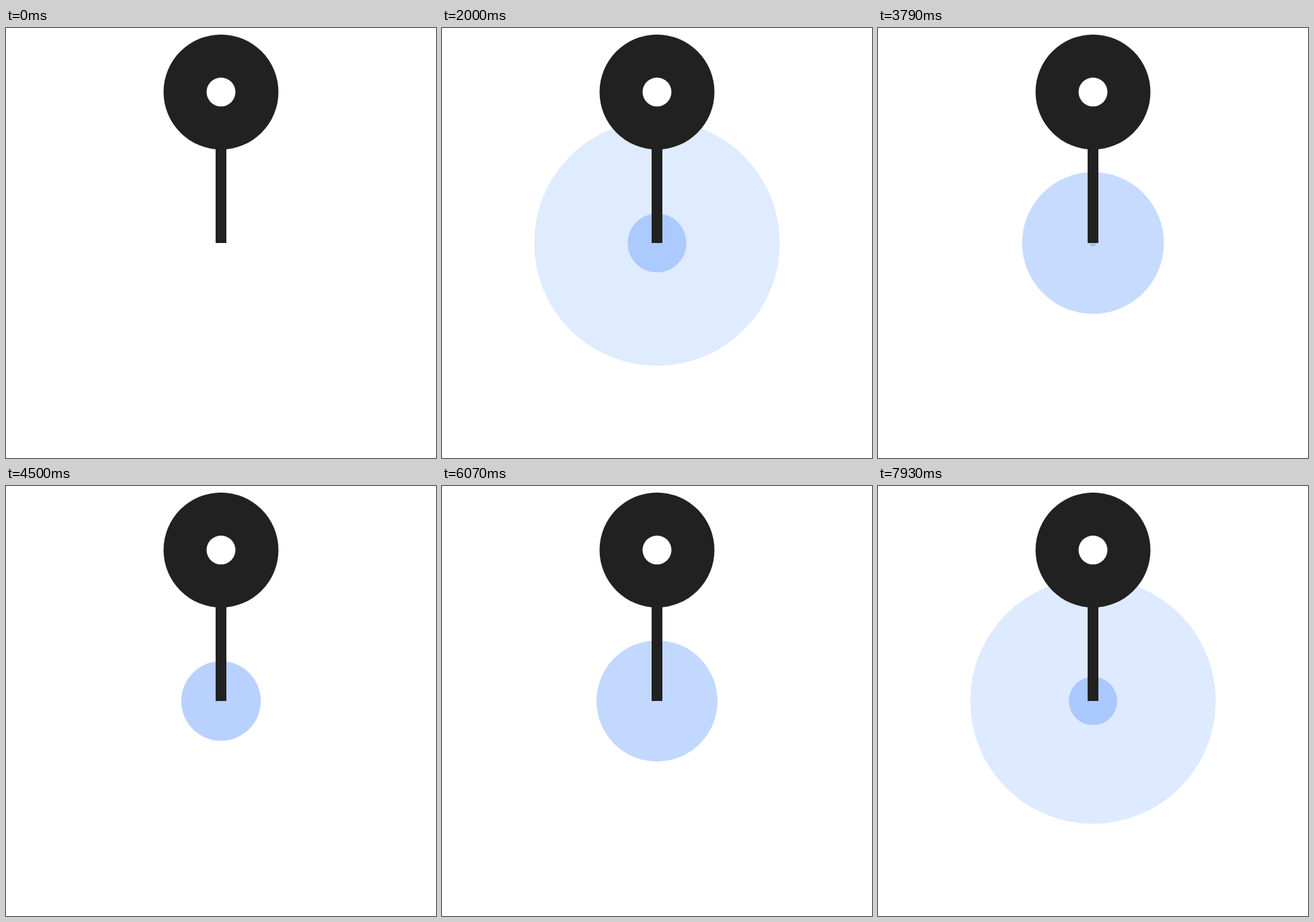
Write an HTML page with a canvas that moves like this. It is 640 px wide and 640 px high and loops after 8 s.

```html
<!DOCTYPE html>
<html>
<head>
<meta charset="utf-8">
<style>
  html, body { margin: 0; width: 100%; height: 100%; overflow: hidden; background: #fff; }
  canvas { display: block; }
</style>
</head>
<body>
<canvas id="stage" width="640" height="640"></canvas>
<script>
const ctx = document.getElementById('stage').getContext('2d');
const LOOP = 8000, LIFE = 2050, STEP = 5.147;
const spawnTimes = [0, 1160, 2400, 3525, 4800, 5960, 7200];

function disc(x, y, r, color) {
  ctx.fillStyle = color;
  ctx.beginPath();
  ctx.arc(x, y, r, 0, Math.PI * 2);
  ctx.fill();
}

// Ripples accelerate outwards and grow in small steps.
function rippleRadius(age) {
  const r = 185 * (Math.max(0, age - 80) / 1920) ** 1.5;
  const steps = r < 40 ? Math.floor(r / STEP + 0.45) : Math.floor(r / STEP) + 0.5;
  return steps * STEP;
}

function rippleAlpha(age) {
  const s = age / 1000;
  return 1 - 0.22 * s - 0.058 * s * s;
}

function draw(t) {
  ctx.fillStyle = '#fff';
  ctx.fillRect(0, 0, 640, 640);

  for (const start of spawnTimes) {
    const age = t - start;
    if (age < 0 || age >= LIFE) continue;
    disc(320, 320, rippleRadius(age), `rgba(159, 193, 254, ${rippleAlpha(age)})`);
  }

  ctx.fillStyle = '#212121';
  ctx.fillRect(312, 170, 16, 150);
  disc(320, 95.3, 85.5, '#212121');
  disc(320, 95.3, 21.5, '#fff');
}

const begin = performance.now();
function tick() {
  draw((performance.now() - begin) % LOOP);
  requestAnimationFrame(tick);
}
tick();
</script>
</body>
</html>
```
